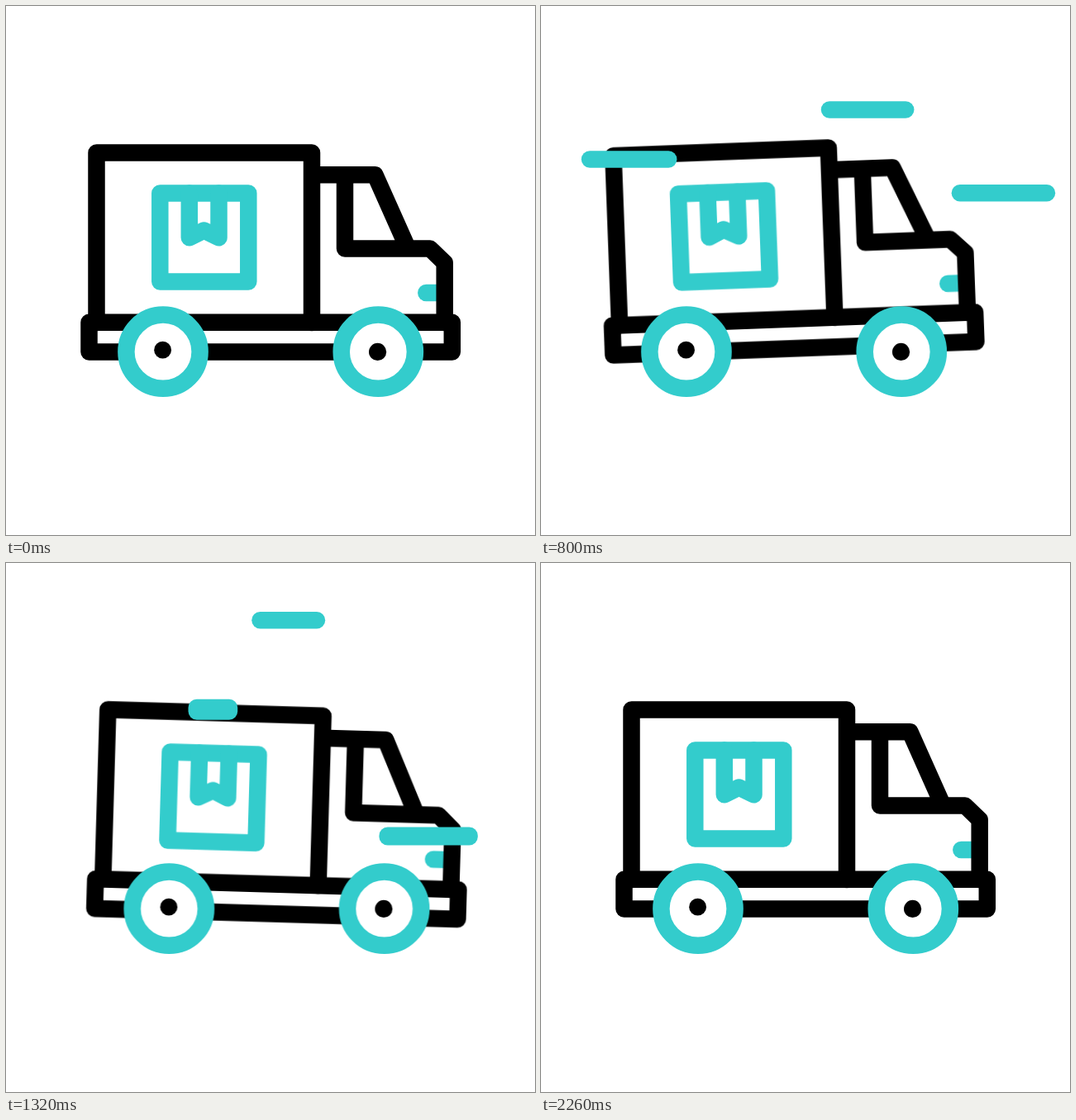
Animation, 640 px wide and 640 px high, one loop 2400 ms. Source, as an HTML page:

```html
<!DOCTYPE html>
<html lang="en">
<head>
<meta charset="utf-8">
<title>Delivery truck</title>
<style>
  html, body { margin: 0; width: 100%; height: 100%; overflow: hidden; background: #fff; }
  svg { display: block; width: 100%; height: 100%; }
  path, rect, circle { stroke-width: 20.5; stroke-linecap: round; stroke-linejoin: round; }
  .ink { fill: none; stroke: #000; }
  .teal { fill: none; stroke: #33cccc; }
  .wheel { fill: #fff; stroke: #33cccc; }
  .streak { fill: #33cccc; opacity: 0; animation: 2400ms linear infinite; }

  .drive, .bounce, .tilt { animation: 2400ms cubic-bezier(.3333, 0, .6667, 1) infinite; }
  .drive { animation-name: drive; }
  .bounce { animation-name: bounce; }
  .tilt { animation-name: tilt; transform-origin: 320px 395px; }

  @keyframes drive {
    0%, 90%, 100% { transform: translateX(0); }
    23.5% { transform: translateX(-45.3px); }
    46.25% { transform: translateX(32.4px); }
    67.92% { transform: translateX(-37.2px); }
  }
  @keyframes bounce {
    0%, 94.17%, 100% { transform: translateY(0); }
    24.17% { transform: translateY(9px); }
    40.4% { transform: translateY(-13px); }
    54.2% { transform: translateY(6px); }
    81% { transform: translateY(-7.4px); }
  }
  @keyframes tilt {
    0%, 90%, 100% { transform: rotate(0deg); }
    23.5% { transform: rotate(-2.85deg); }
    67.92% { transform: rotate(2.85deg); }
  }
</style>
</head>
<body>
<svg viewBox="0 0 640 640">
  <g class="drive">
    <g class="bounce">
      <g class="tilt">
        <path class="teal" d="M508.3 347H526"/>
        <path class="ink" d="M109.5 383V177.5H370V383M370 204.3H446.5L486 293M410 204.3V293.5H513L530.7 310.7V383"/>
        <rect class="ink" x="100.5" y="382.8" width="439.3" height="35.7"/>
        <rect class="teal" x="186.3" y="226.5" width="107" height="107"/>
        <path class="teal" d="M221.8 226.5V280.2L239.5 271.5L257.5 280.2V226.5"/>
      </g>
    </g>
    <circle class="wheel" cx="190" cy="418.2" r="44.6"/>
    <circle class="wheel" cx="450.3" cy="418.2" r="44.6"/>
    <circle cx="189.6" cy="416.2" r="10.4"/>
    <circle cx="449.6" cy="418.4" r="10.6"/>
  </g>
  <g id="streaks"></g>
</svg>
<script>
  const LOOP = 2400, CAP = 10.2;

  // Each streak draws on from x0 to x1, then its tail follows.
  const streaks = [
    { y: 125.5, h: 20.4, x0: 556, x1: 349, head: 206, tail: 557, dur: 440 },
    { y: 185.5, h: 20.4, x0: 269, x1: 59, head: 309, tail: 560, dur: 441 },
    { y: 226.3, h: 20.4, x0: 612, x1: 413, head: 578, tail: 875, dur: 422 },
    { y: 69.2, h: 20.4, x0: 376, x1: 158, head: 1164, tail: 1414, dur: 499 },
    { y: 177.3, h: 25, x0: 270, x1: 64, head: 1247, tail: 1515, dur: 388 },
    { y: 330.5, h: 22, x0: 572, x1: 361, head: 1060, tail: 1294, dur: 499 },
    { y: 253.5, h: 20.4, x0: 500, x1: 271, head: 1335, tail: 1558, dur: 485 }
  ];

  const pct = t => (t / LOOP * 100).toFixed(3) + '%';
  const at = (s, start, t) =>
    s.x0 + (s.x1 - s.x0) * Math.min(1, Math.max(0, (t - start) / s.dur));

  function pose(s, t, shown) {
    const left = at(s, s.head, t), right = at(s, s.tail, t);
    return `x:${left - CAP}px;width:${right - left + 2 * CAP}px;opacity:${shown}`;
  }

  function keyframes(s, name) {
    const end = s.tail + s.dur;
    const stops = [
      [0, 0], [s.head - .1, 0], [s.head, 1], [s.head + s.dur, 1],
      [s.tail, 1], [end, 1], [end + .1, 0], [LOOP, 0]
    ].sort((a, b) => a[0] - b[0]);
    return `@keyframes ${name}{${stops.map(([t, shown]) => `${pct(t)}{${pose(s, t, shown)}}`).join('')}}`;
  }

  const style = document.createElement('style');
  style.textContent = streaks.map((s, i) => keyframes(s, 'streak' + i)).join('\n');
  document.head.append(style);

  document.getElementById('streaks').innerHTML = streaks.map((s, i) =>
    `<rect class="streak" y="${s.y - s.h / 2}" height="${s.h}" rx="${CAP}" ry="${CAP}" style="animation-name:streak${i}"/>`
  ).join('');
</script>
</body>
</html>
```
